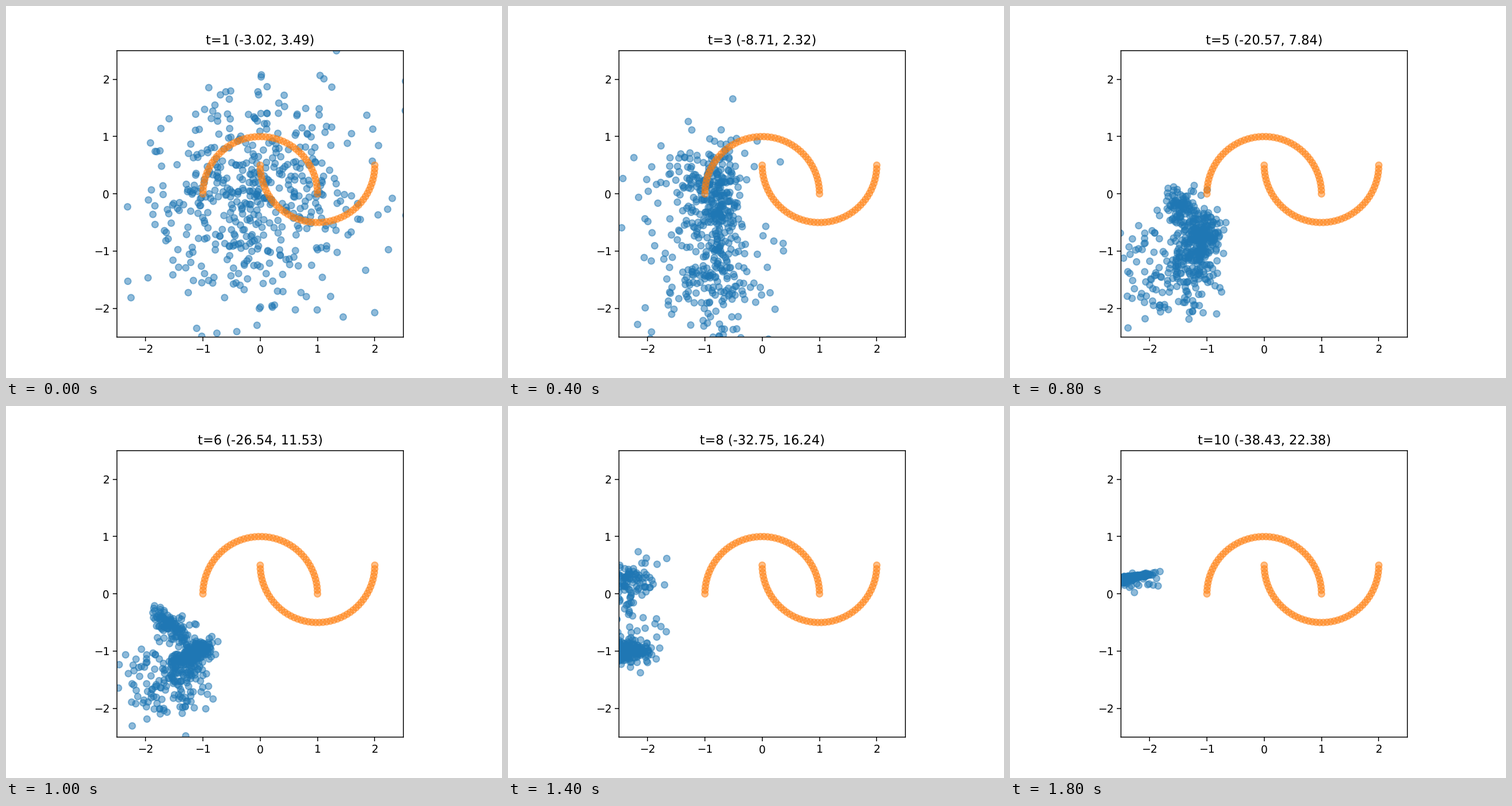
A matplotlib script for the animation above (2000 ms loop, 864x648 px).

```python
import numpy as np
import matplotlib.pyplot as plt
from matplotlib.animation import FuncAnimation

DPI = 135
STEPS = 10
STEP_MS = 200
KEYS = [1, 2, 3, 4, 6, 8, 10]   # steps with a set pose; the rest is interpolated

LOSS_A = [-3.02, -5.68, -8.71, -14.60, -26.54, -32.75, -38.43]
LOSS_B = [3.49, 1.88, 2.32, 4.16, 11.53, 16.24, 22.38]

plt.rcParams["text.hinting"] = "none"
rng = np.random.default_rng(7)


def at(step, values):
    return np.interp(step, KEYS, values)


def swarm(n, cx, cy, sx, sy, slope=(0,) * len(KEYS)):
    """Normal points whose centre, spread and slant change with the step."""
    u, v = rng.standard_normal((2, n))

    def place(step):
        dx = at(step, sx) * u
        dy = at(step, sy) * v + at(step, slope) * dx
        return np.column_stack([at(step, cx) + dx, at(step, cy) + dy])

    return place


core = swarm(190,
             cx=[0, -0.6, -0.72, -0.98, -1.12, -2.35, -2.35],
             cy=[0, 0, -0.35, -0.5, -1.03, -1.02, 0.27],
             sx=[0.92, 0.5, 0.2, 0.17, 0.17, 0.25, 0.2],
             sy=[0.92, 0.4, 0.65, 0.36, 0.09, 0.08, 0.015],
             slope=[0, 0, 0, 0, 0.3, 0, 0.2])
upper = swarm(100,
              cx=[0, -0.9, -0.9, -1.25, -1.55, -2.3, -2.25],
              cy=[0.1, 0.35, 0.25, 0.1, -0.52, 0.3, 0.31],
              sx=[1, 0.6, 0.32, 0.15, 0.17, 0.25, 0.17],
              sy=[1, 0.35, 0.36, 0.3, 0.13, 0.17, 0.015],
              slope=[0, 0, 0, 0, -0.6, 0, 0.12])
lower = swarm(120,
              cx=[0, -0.45, -0.85, -1.25, -1.35, -2.6, -2.6],
              cy=[-0.1, -1.55, -1.6, -1.25, -1.3, -0.95, 0.21],
              sx=[1, 0.55, 0.48, 0.27, 0.2, 0.3, 0.15],
              sy=[0.95, 0.4, 0.45, 0.45, 0.34, 0.12, 0.02],
              slope=[0, 0.35, 0, 0, 0, 0, 0.2])
fringe = swarm(90,
               cx=[0, -0.8, -1.3, -1.95, -1.8, -2.6, -2.7],
               cy=[0, -0.3, -0.5, -1.2, -1.6, -0.4, 0.18],
               sx=[1.1, 0.95, 0.65, 0.5, 0.38, 0.36, 0.33],
               sy=[1.1, 0.85, 0.95, 0.75, 0.45, 0.5, 0.08])


def moons(n=50):
    a = np.linspace(0, np.pi, n)
    x = np.append(np.cos(a), 1 - np.cos(a))
    y = np.append(np.sin(a), 0.5 - np.sin(a))
    return x, y


def dots(x, y, color):
    # Two equal widths keep the markers off the whole-pixel grid.
    return ax.scatter(x, y, s=36, c=color, alpha=0.5, linewidths=[1, 1])


fig, ax = plt.subplots(figsize=(6.4, 4.8), dpi=DPI)
ax.set_aspect("equal")
samples = dots([0], [0], "C0")
dots(*moons(), "C1")
ax.set(xlim=(-2.5, 2.5), ylim=(-2.5, 2.5),
       xticks=range(-2, 3), yticks=range(-2, 3))
for spine in ax.spines.values():
    spine.set_snap(False)
title = ax.set_title("")


def draw(i):
    step = i + 1
    samples.set_offsets(np.vstack([s(step) for s in (core, upper, lower, fringe)]))
    title.set_text(f"t={step} ({at(step, LOSS_A):.2f}, {at(step, LOSS_B):.2f})")
    return samples, title


anim = FuncAnimation(fig, draw, frames=STEPS, interval=STEP_MS,
                     init_func=lambda: draw(0), repeat=True, repeat_delay=0)
plt.show()
```
